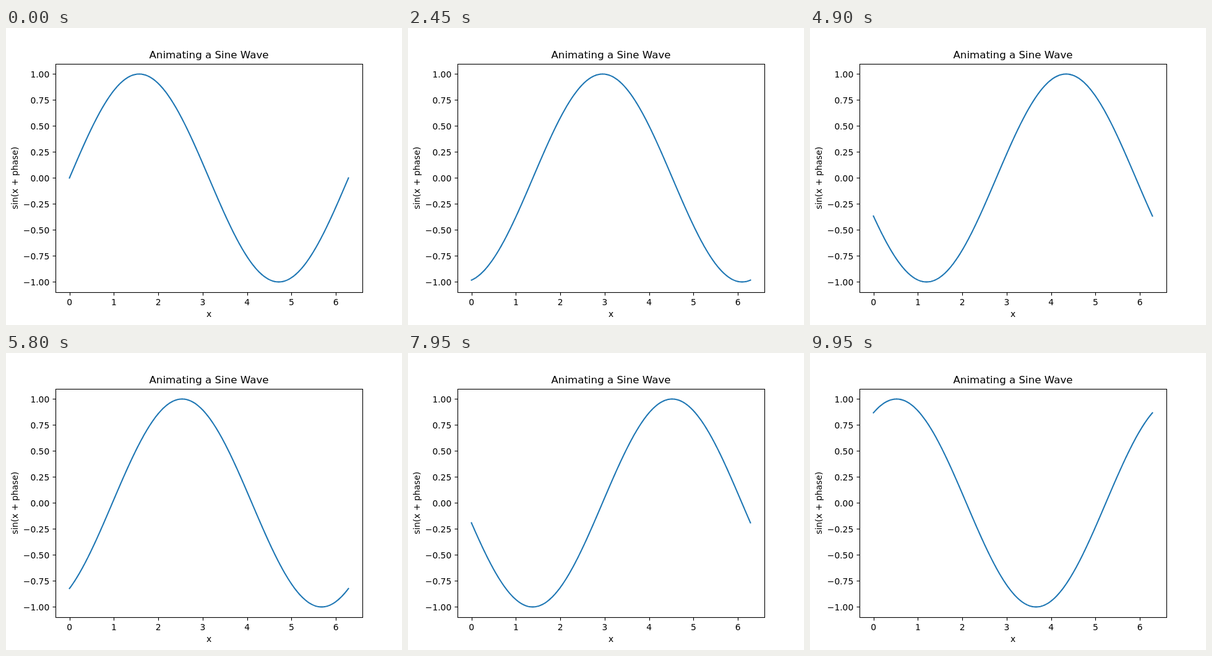
Animation, 640 px wide and 480 px high, one loop 10 s. Source, as an HTML page with a canvas:

```html
<!DOCTYPE html>
<html lang="en">
<head>
<meta charset="utf-8">
<title>Sine wave</title>
<style>
  html, body { margin: 0; width: 100%; height: 100%; overflow: hidden; background: #fff; }
  canvas { display: block; width: 640px; height: 480px; }
</style>
</head>
<body>
<canvas id="plot" width="640" height="480"></canvas>
<script>
const ctx = document.getElementById('plot').getContext('2d');

const PT = 100 / 72;
const STEP_MS = 50, STEPS = 200, PHASE_STEP = 0.1;
const AXES = { left: 80, right: 576, top: 57.6, bottom: 427.2 };
const SAMPLES = 400;

const unitX = (AXES.right - AXES.left) / 1.1 / (2 * Math.PI);
const toX = x => AXES.left + (AXES.right - AXES.left) / 22 + x * unitX;
const toY = y => 242.4 - 168 * y;
const snap = v => Math.round(v) + 0.5;

function text(str, x, y, align = 'center', size = 10, angle = 0) {
  ctx.save();
  ctx.translate(x, y);
  ctx.rotate(angle);
  ctx.font = `${size * PT}px "DejaVu Sans", sans-serif`;
  ctx.textAlign = align;
  ctx.fillText(str, 0, 0);
  ctx.restore();
}

function line(x1, y1, x2, y2) {
  ctx.beginPath();
  ctx.moveTo(x1, y1);
  ctx.lineTo(x2, y2);
  ctx.stroke();
}

function drawCurve(phase) {
  ctx.strokeStyle = '#1f77b4';
  ctx.lineWidth = 1.5 * PT;
  ctx.lineCap = 'square';
  ctx.lineJoin = 'round';
  ctx.beginPath();
  for (let i = 0; i <= SAMPLES; i++) {
    const x = 2 * Math.PI * i / SAMPLES;
    ctx.lineTo(toX(x), toY(Math.sin(x + phase)));
  }
  ctx.stroke();
}

function drawAxes() {
  const left = snap(AXES.left), right = snap(AXES.right);
  const top = snap(AXES.top), bottom = snap(AXES.bottom);
  ctx.strokeStyle = ctx.fillStyle = '#000';
  ctx.lineWidth = 0.8 * PT;
  ctx.lineCap = 'butt';
  ctx.lineJoin = 'miter';
  ctx.strokeRect(left, top, right - left, bottom - top);

  for (let x = 0; x <= 6; x++) {
    line(snap(toX(x)), bottom, snap(toX(x)), bottom + 5);
    text(String(x), toX(x), 448);
  }
  for (let i = -4; i <= 4; i++) {
    const y = toY(i / 4);
    line(left - 5, snap(y), left, snap(y));
    text((i < 0 ? '\u2212' : '') + Math.abs(i / 4).toFixed(2), 70.28, Math.round(y + 5.5), 'right');
  }

  text('Animating a Sine Wave', 328, 49, 'center', 12);
  text('x', 328, 467);
  text('sin(x + phase)', 19, 242.4, 'center', 10, -Math.PI / 2);
}

function draw() {
  const step = Math.floor(performance.now() / STEP_MS) % STEPS;
  ctx.fillStyle = '#fff';
  ctx.fillRect(0, 0, 640, 480);
  drawCurve(step * PHASE_STEP);
  drawAxes();
  requestAnimationFrame(draw);
}
draw();
</script>
</body>
</html>
```
